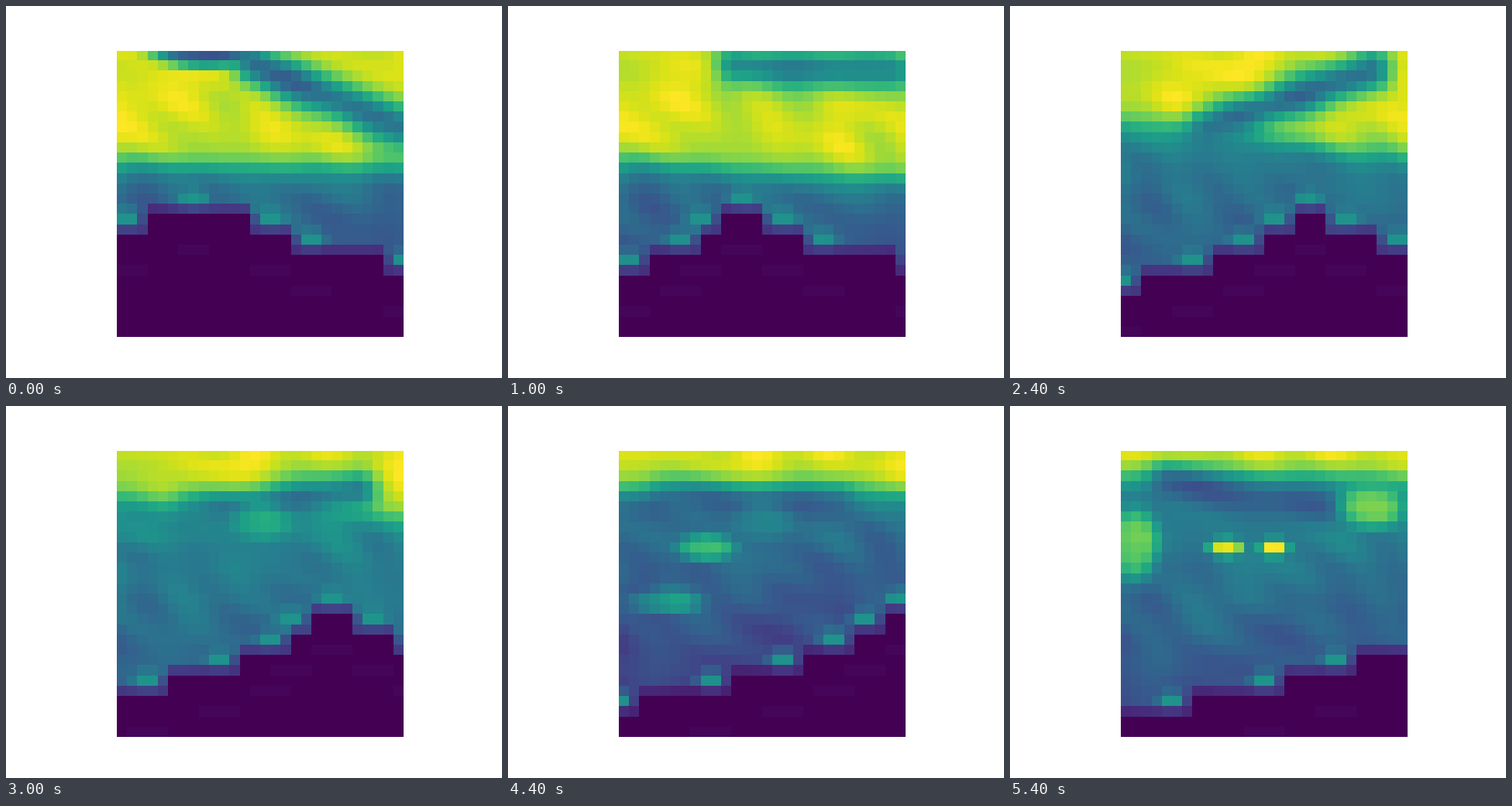
Recreate the animation shown at these times as a matplotlib script. Size 640 by 480 pixels, loop 5.6 s.

```python
import numpy as np
import matplotlib.pyplot as plt
from matplotlib.animation import FuncAnimation

N = 28
FRAMES = 28
Y, X = np.mgrid[0:N, 0:N].astype(float)

# Key steps of the weather: cloud base at both sides, haze, and the dark streak.
KEYS = [0, 5, 9, 12, 18, 22, 27]
BASE_LEFT = [10.6, 10.4, 7.7, 6.2, 1.8, 3.3, 1.8]
BASE_RIGHT = [10.8, 12, 11.4, 9.8, 1.8, 3.5, 2]
HAZE = [.36, .36, .37, .38, .43, .3, .36]
STREAK_LEFT = [1, 1.1, 5.5, 7, 4.5, 4.7, 3]
STREAK_RIGHT = [7.3, 1.5, .4, 1.5, 5.5, 5, 5]
STREAK_VALUE = [.34, .44, .4, .36, .42, .3, .28]

# Passing puffs: step of full strength, centre, radii, value.
PUFFS = [
    (0, 8, -.3, 5, 1.5, .26),
    (18, 13.5, 6.5, 3, 1.8, .8),
    (18, 5, 9.6, 6, 1.3, .34),
    (22, 8, 9, 2.8, 1.3, .66),
    (22, 4, 14.3, 3.5, 1.3, .53),
    (27, 24, 5, 3, 2.2, .74),
    (27, 1, 8.5, 2.2, 3.5, .74),
    (27, 9.7, 9, 1.7, .9, .9),
    (27, 14.5, 9, 1.4, .9, .95),
]

rng = np.random.default_rng(4)
WAVES = rng.normal(0, 1, (14, 4)) * [.5, .7, .12, 3]


def key(values, step):
    return np.interp(step, KEYS, values)


def soft(field, dist2, value, strength=1.0):
    """Blend towards value with a Gaussian edge."""
    return field + strength * np.exp(-dist2) * (value - field)


def ground(step):
    """Terraces falling away on both sides of a summit that drifts right."""
    summit = 7 + .9 * step
    flat = 1.5 + max(0, 3 - .6 * step)
    x = np.arange(N)
    slope = np.where(x < summit, 1.85, 1.35)
    drop = slope * np.sqrt(np.maximum(abs(x - summit) - flat, 0))
    return summit, 16 + 2 * np.round(drop / 2)


def glints(summit, top):
    """A light spot beside every terrace step and one over the summit."""
    spots = [(summit, 14)]
    for c in np.flatnonzero(np.diff(top)) + 1:
        x = c - 2.5 if top[c] < top[c - 1] else c + 1.5
        spots.append((x, max(top[c], top[c - 1]) - 2))
    return spots


def weather(step):
    side = X / (N - 1)
    base = key(BASE_LEFT, step) * (1 - side) + key(BASE_RIGHT, step) * side
    haze = key(HAZE, step) - .01 * (Y - 12)
    sky = haze + (.92 - haze) / (1 + np.exp((Y - base) / .7))

    x0, x1 = max(4, 13 - .42 * step), 28 - .33 * step
    y0, y1 = key(STREAK_LEFT, step), key(STREAK_RIGHT, step)
    dx, dy = x1 - x0, y1 - y0
    t = np.clip(((X - x0) * dx + (Y - y0) * dy) / (dx * dx + dy * dy), 0, 1)
    dist2 = (X - x0 - t * dx) ** 2 + (Y - y0 - t * dy) ** 2
    sky = soft(sky, dist2 / 2 ** 2, key(STREAK_VALUE, step))

    for when, x, y, rx, ry, value in PUFFS:
        strength = max(0, 1 - abs(step - when) / 5)
        dist2 = ((X - x) / rx) ** 2 + ((Y - y) / ry) ** 2
        sky = soft(sky, dist2 ** 2, value, strength)

    ripple = sum(np.sin(a * X + b * Y + c * step + d) for a, b, c, d in WAVES)
    return sky + .011 * ripple


def picture(step):
    summit, top = ground(step)
    sky = weather(step)
    echo = np.zeros((N, N))
    for x, y in glints(summit, top):
        sky = soft(sky, (((X - x) / 1.4) ** 2 + (Y - y) ** 2) ** 2, .52, .9)
        echo[(abs(X - x) < 1.6) & (Y == y + 5)] = .018

    solid = Y >= top
    sky = sky / sky[~solid].max()
    pad = np.pad(solid, 1, mode="edge")
    above = pad[2:, 1:-1]
    beside = pad[1:-1, :-2] | pad[1:-1, 2:]
    sky[above] *= .5
    sky[beside & ~above] *= .65
    return np.where(solid, echo, sky)


fig = plt.figure(figsize=(6.4, 4.8), dpi=100)
ax = fig.add_subplot()
ax.axis("off")
image = ax.imshow(picture(0), cmap="viridis", vmin=0, vmax=1)


def update(step):
    image.set_data(picture(step))
    return [image]


anim = FuncAnimation(fig, update, frames=FRAMES, interval=200, repeat=True, repeat_delay=0)
plt.show()
```
